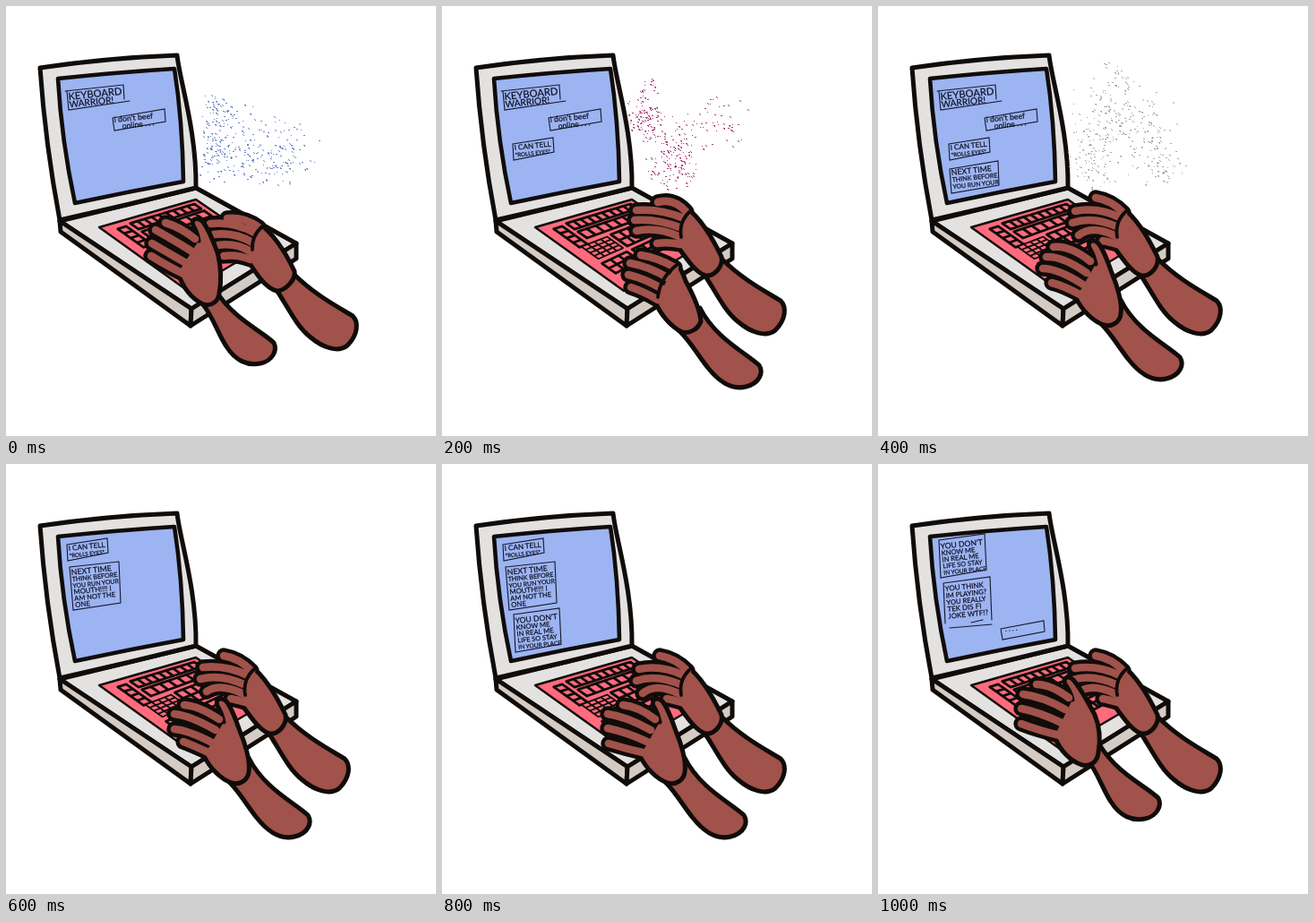
These frames come from a looping animation (480x480 px, 1200 ms). An HTML page:

```html
<!DOCTYPE html>
<html lang="en">
<head>
<meta charset="utf-8">
<title>Typing hands</title>
<style>
html, body { margin: 0; width: 100%; height: 100%; overflow: hidden; background: #fff; }
svg { display: block; width: 100%; height: 100%; }
text { font-family: Lato, "Open Sans", sans-serif; fill: #0d0f20; stroke: #0d0f20; stroke-width: .2; }
.line { fill: none; stroke: #100c0a; stroke-width: 5; stroke-linecap: round; stroke-linejoin: round; }
.bubble { fill: none; stroke: #14182c; stroke-width: 1.1; stroke-linecap: round; }
</style>
</head>
<body>
<svg id="stage" viewBox="0 0 480 480"></svg>
<script>
const LOOP = 1200, STEP = 200;
const SKIN = "#a1524a", PINK = "#ff6b7d";
const stage = document.getElementById("stage");

const shape = (d, fill, width = 5) =>
  `<path class="line" d="${d}" style="fill:${fill};stroke-width:${width}"/>`;
const shift = (x, y, body) => `<g transform="translate(${x} ${y})">${body}</g>`;

// Keyboard: u runs along the back edge, v towards the front.
function keyPoint(u, v) {
  const x = 104 + 108 * u + 99 * v - 23 * u * v;
  const y = 247 - 31 * u + 71 * v - 19 * u * v;
  return x.toFixed(1) + "," + y.toFixed(1);
}

function patch(u0, v0, u1, v1) {
  return `M${keyPoint(u0, v0)}L${keyPoint(u1, v0)}L${keyPoint(u1, v1)}L${keyPoint(u0, v1)}Z`;
}

function keys(u, v, w, h, cols, rows) {
  let d = "";
  for (let r = 0; r < rows; r++) {
    for (let c = 0; c < cols; c++) {
      const a = u + w * c / cols, b = v + h * r / rows;
      d += patch(a, b, a + w / cols, b + h / rows);
    }
  }
  return shape(d, PINK, rows > 2 && cols > 1 ? 1.8 : 2.8);
}

const laptop =
  shape("M60,240L212,203L324,265L207,338Z", "#e4e2e1") +
  shape("M60,240L61,252L206,357L207,338Z", "#d4ccc4") +
  shape("M207,338L206,357L324,282L324,265Z", "#d4ccc4") +
  shape("M38,69Q112,58 191,55C194,84 213,140 212,203Q136,222 60,239Q44,155 38,69Z", "#e4e2e1") +
  shape("M58,81Q124,74 188,70Q197,128 198,196Q138,207 77,220Q62,150 58,81Z", "#9db4f2", 4.6) +
  shape(patch(0, 0, 1, 1), PINK, 2.4) +
  keys(.12, .08, .09, .3, 1, 4) +
  keys(.27, .06, .67, .1, 9, 1) +
  keys(.27, .2, .67, .11, 7, 1) +
  keys(.14, .38, .29, .2, 4, 4) +
  keys(.48, .37, .45, .21, 5, 2) +
  keys(.12, .64, .3, .16, 3, 2) +
  keys(.48, .64, .45, .16, 4, 2);

// Chat bubbles; each line of text is [words, size].
function bubble(box, x, y, step, lines) {
  const rows = lines.map(([words, size], i) =>
    `<text transform="translate(${x + i * .9} ${y + i * step}) rotate(-6)" font-size="${size}">${words}</text>`);
  return `<path class="bubble" d="${box}"/>` + rows.join("");
}

const title = bubble("M66,95L131,88L132,104M68,95L70,116L138,106", 70, 105, 8.4,
  [["KEYBOARD", 11.2], ["WARRIOR!", 10.2]]);
const reply = bubble("M119,125L177,115L178,129L121,139Z", 121, 130, 0, [["i don't beef", 8.8]]) +
  bubble("", 130, 137, 0, [["online . . .", 8.6]]);
const tell = bubble("M79,154L124,147L125,163L80,172Z", 81, 161, 7.6,
  [["I CAN TELL", 8.1], ["*ROLLS EYES*", 6.2]]);
const next = [["NEXT TIME", 8.8], ["THINK BEFORE", 7.2], ["YOU RUN YOUR", 6.9]];
const nextStart = bubble("M80,182L134,173L135,200L82,209Z", 82, 189, 7.6, next);
const nextFull = bubble("M71,115L126,109L128,155L75,163Z", 73, 124, 7.2,
  [...next, ["MOUTH!!!! I", 7.8], ["AM NOT THE", 7.5], ["ONE", 7.8]]);
const place = bubble("M80,168L131,161L133,201L82,210Z", 82, 178, 7.2,
  [["YOU DON'T", 8.6], ["KNOW ME", 7.6], ["IN REAL ME", 7.6], ["LIFE SO STAY", 7.3], ["IN YOUR PLACE", 6.6]]);
const joke = bubble("M73,133L125,126L127,174M73,133L75,178M80,183L127,179M104,177L117,174", 75, 142, 7.7,
  [["YOU THINK", 8], ["IM PLAYING?", 7.6], ["YOU REALLY", 7.6], ["TEK DIS FI", 8], ["JOKE WTF!?", 8]]);
const dots = bubble("M137,184L185,175L186,187L139,196Z", 142, 187, 0, [[". . . .", 8]]);

const scrolled = shift(-11, -64, tell) + nextFull;
const screens = [
  title + reply,
  title + reply + tell,
  title + reply + tell + nextStart,
  scrolled,
  scrolled + place,
  shift(-12, -83, place) + joke + dots
];

// Hands: finger outlines lie under the palm, finger fills run into it.
function hand(arm, palm, fingers, crease) {
  const curves = fingers.map(([tip, bend, base]) => `M${tip}Q${bend} ${base}`).join("");
  return arm +
    `<path class="line" d="${curves}" style="stroke-width:17.4"/>` +
    shape(palm, SKIN) +
    `<path class="line" d="${curves}" style="stroke:${SKIN};stroke-width:8.6"/>` +
    shape(crease, "none", 3.8);
}

const armBack = shape("M293,300C305,318 315,340 330,352C345,365 362,370 372,362C384,350 385,336 378,329C360,318 335,305 312,282", SKIN);
const armHigh = shape("M219,332C232,348 236,365 246,380C256,396 270,402 284,399C298,396 303,384 299,376C285,362 254,350 233,316", SKIN);
const armLow = shape("M247,353C258,362 268,380 280,395C292,410 306,420 322,416C338,412 342,400 337,392C322,378 288,362 271,328", SKIN);

const palmBack = "M274,226C287,236 301,257 312,280C314,290 305,302 294,301C284,298 275,285 262,267";
const palmLow = "M221,326C228,340 240,352 252,356C262,359 270,352 271,344C273,332 267,312 261,298C256,284 252,272 246,265C240,259 233,263 236,270Q241,278 243,288";
const knuckle = "M277,229Q264,241 267,258";

const backRaised = hand(armBack, palmBack, [
  ["241,219", "259,214", "273,230"], ["217,228", "244,226", "270,237"],
  ["215,239", "240,237", "268,248"], ["217,251", "240,246", "264,257"],
  ["240,265", "252,263", "266,266"]], knuckle);

const backTyping = lift => hand(armBack, palmBack, [
  ["243,214", "261,217", "274,231"], [`220,${229 - lift}`, "245,224", "270,236"],
  [`217,${242 - lift}`, "240,234", "268,247"], [`224,${256 - lift}`, "238,244", "264,256"],
  ["251,262", "257,263", "267,266"]], knuckle);

const backStart = hand(shift(9, 17, armBack),
  "M283,243C298,254 312,275 322,296C324,305 312,318 302,318C290,315 280,300 270,284", [
  ["247,237", "266,235", "282,247"], ["228,243", "255,240", "279,254"],
  ["232,255", "255,252", "275,264"], ["237,267", "256,264", "273,274"],
  ["243,279", "258,277", "273,283"]], "M286,246Q274,257 275,272");

const frontStart = hand(armHigh,
  "M192,298C197,313 206,326 220,333C230,336 237,329 238,321C241,305 240,290 236,275C231,262 226,248 219,240C213,235 206,238 209,245Q214,254 215,262", [
  ["178,242", "195,247", "211,260"], ["167,250", "185,260", "206,273"],
  ["163,265", "180,275", "201,287"], ["162,279", "178,289", "198,299"]], "");

const frontReach = hand(shift(17, 9, armLow),
  "M238,330C243,343 255,358 268,364C278,366 286,360 289,352C288,338 278,318 272,307Q268,295 262,287", [
  ["222,278", "241,281", "260,292"], ["210,287", "232,291", "253,304"],
  ["208,300", "226,304", "246,316"], ["211,314", "226,319", "241,328"]], "M262,289Q243,304 241,325");

const frontLow = fingers => hand(armLow, palmLow, fingers, "");

const frontBack = hand(shift(14, -3, armHigh),
  "M197,304C203,320 215,332 228,336C238,338 245,332 246,322C249,305 247,292 242,280C234,265 226,250 218,241C212,235 206,239 209,246Q215,254 217,263", [
  ["177,246", "193,246", "213,261"], ["162,257", "185,260", "209,274"],
  ["160,273", "180,277", "205,289"], ["160,290", "178,297", "203,303"]], "");

const low = [
  [["196,269", "214,267", "237,285"], ["188,280", "206,279", "233,298"],
   ["184,293", "201,293", "229,311"], ["194,309", "207,312", "227,323"]],
  [["199,269", "215,270", "238,285"], ["188,279", "206,281", "234,297"],
   ["188,296", "203,297", "230,311"], ["198,310", "209,314", "228,323"]],
  [["202,269", "220,271", "238,285"], ["185,279", "206,282", "233,297"],
   ["185,295", "205,299", "229,310"], ["186,312", "206,318", "228,323"]]
].map(frontLow);

const hands = [
  backStart + frontStart,
  backRaised + frontReach,
  backTyping(0) + low[0],
  backTyping(2) + low[1],
  backTyping(0) + low[2],
  backTyping(1) + frontBack
];

// Spray of tiny specks; each cluster is [x, y, spread x, spread y, count].
function spray(color, seed, clusters) {
  const rnd = () => (seed = (seed * 16807) % 2147483647) / 2147483647;
  const bell = () => rnd() + rnd() - 1;
  let d = "";
  for (const [x, y, w, h, count] of clusters) {
    for (let i = 0; i < count; i++) {
      const px = Math.round(x + bell() * w), py = Math.round(y + bell() * h);
      const size = rnd() < .45 ? 2 : 1;
      d += `M${px},${py}h${size}v1h-${size}z`;
      if (rnd() < .4) d += `M${px + 1},${py + 1}h1v1h-1z`;
    }
  }
  return `<path d="${d}" fill="${color}" shape-rendering="crispEdges"/>`;
}

const sprays = [
  spray("#6f87cb", 7121, [[238, 118, 24, 22, 55], [232, 160, 20, 38, 65], [266, 155, 46, 46, 110], [298, 178, 42, 28, 55], [318, 152, 34, 32, 35]]),
  spray("#a8417a", 4409, [[228, 128, 22, 26, 95], [226, 94, 16, 22, 22], [258, 180, 32, 28, 95], [262, 146, 40, 30, 55], [308, 132, 36, 40, 42]]),
  spray("#a9a9a9", 9173, [[264, 84, 30, 30, 32], [264, 125, 50, 46, 110], [240, 168, 30, 38, 85], [296, 150, 40, 50, 85], [316, 182, 30, 22, 32]])
];

const scenes = screens.map((screen, i) => laptop + screen + (sprays[i] || "") + hands[i]);
let shown = -1;

function draw(time) {
  const index = Math.floor((time % LOOP) / STEP);
  if (index === shown) return;
  shown = index;
  stage.innerHTML = scenes[index];
}

function tick() {
  draw(performance.now());
  requestAnimationFrame(tick);
}
tick();
</script>
</body>
</html>
```
